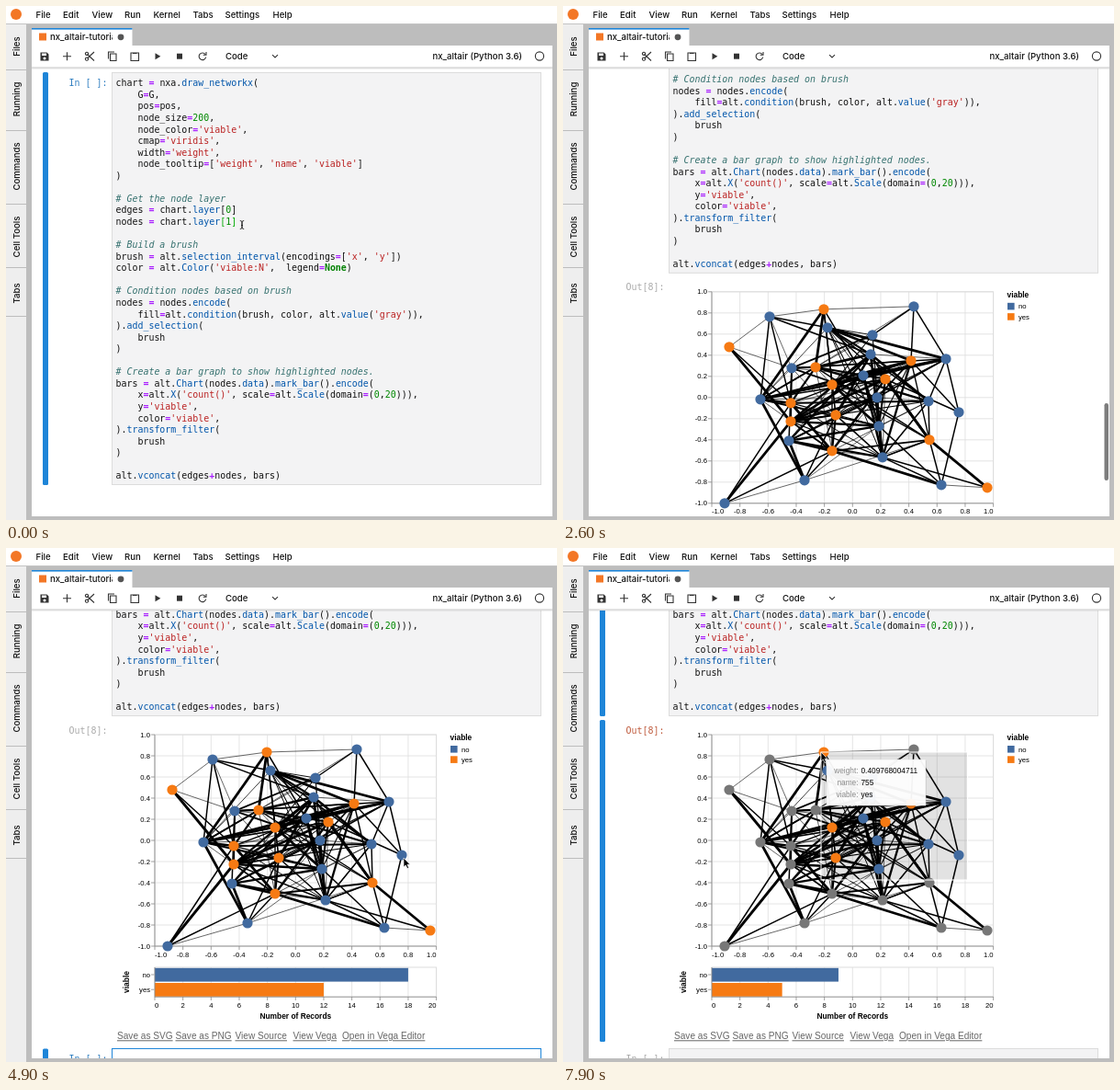
An HTML page for the animation above (8000 ms loop, 600x559 px).

```html
<!DOCTYPE html>
<html lang="en">
<head>
<meta charset="utf-8">
<title>Notebook brush demo</title>
<style>
html, body { margin: 0; width: 100%; height: 100%; overflow: hidden; background: #fff; }
svg { display: block; width: 600px; height: 559px; }
text { white-space: pre; }
.ui { font: 500 9.6px Inter, sans-serif; fill: #111; }
.code { font: 9.95px "DejaVu Sans Mono", monospace; fill: #111; }
.chart { font: 7.7px "Liberation Sans", Arial, sans-serif; fill: #000; }
.title { font-size: 8.4px; font-weight: bold; }
.link { font: 10.1px "Liberation Sans", Arial, sans-serif; fill: #666; text-decoration: underline; }
.tip { font: 8.3px "Liberation Sans", Arial, sans-serif; }
.icon { fill: none; stroke: #333; stroke-width: 1.1; }
.comment { fill: #36716f; font-style: italic; }
.string { fill: #ba2121; }
.op { fill: #a2f; font-weight: bold; }
.num { fill: #080; }
.word { fill: #008000; font-weight: bold; }
.prop { fill: #05a; }
.match { fill: #0a0; }
</style>
</head>
<body>
<script>
const LOOP = 8000, RUN = 1000, SELECT = 6500, DRAG = 6600, TIP = 7700;
const BLUE = '#416a9f', ORANGE = '#f67a13', GRAY = '#777', ACCENT = '#1e85d8', CELL = '#f3f3f4';
const LEFT = 162, TOP = 541, WIDE = 306.6, HIGH = 230, SCROLL_END = 338;

function el(tag, attrs, parent, text) {
  const node = document.createElementNS('http://www.w3.org/2000/svg', tag);
  for (const k in attrs) node.setAttribute(k, attrs[k]);
  if (text !== undefined) node.textContent = text;
  return parent.appendChild(node);
}
const set = (node, attrs) => { for (const k in attrs) node.setAttribute(k, attrs[k]); };
const show = (node, on) => node.setAttribute('visibility', on ? 'visible' : 'hidden');
const group = (parent, attrs = {}) => el('g', attrs, parent);
const rect = (parent, x, y, width, height, fill, more) =>
  el('rect', { x, y, width, height, fill, ...more }, parent);
const line = (parent, x1, y1, x2, y2, stroke, width = 1) =>
  el('line', { x1, y1, x2, y2, stroke, 'stroke-width': width }, parent);
const label = (parent, x, y, text, cls, anchor = 'start', more) =>
  el('text', { x, y, class: cls, 'text-anchor': anchor, ...more }, parent, text);

// Value of a keyframe track [[time, value], ...] at time t
function track(keys, t) {
  if (t <= keys[0][0]) return keys[0][1];
  for (let i = 1; i < keys.length; i++) {
    const [a, u] = keys[i - 1], [b, v] = keys[i];
    if (t < b) return u + (v - u) * (t - a) / (b - a);
  }
  return keys[keys.length - 1][1];
}
const smooth = (a, b, t) => {
  const p = Math.min(1, Math.max(0, (t - a) / (b - a)));
  return p * p * (3 - 2 * p);
};

const svg = el('svg', { viewBox: '0 0 600 559' }, document.body);
const defs = el('defs', {}, svg);
rect(el('clipPath', { id: 'page' }, defs), 28, 68, 567, 487);
rect(el('clipPath', { id: 'tab' }, defs), 46, 24, 70, 19);

// ---- Window frame ----
rect(svg, 0, 0, 600, 559, '#fff');
rect(svg, 0, 19.5, 23, 540, '#eee');
rect(svg, 23, 19.5, 577, 540, '#bdbdbd');
rect(svg, 28, 43, 567, 512, '#fff');
line(svg, 0, 19.5, 600, 19.5, '#c4c4c4');
line(svg, 22.5, 20, 22.5, 559, '#bdbdbd');
el('circle', { cx: 11, cy: 9, r: 6, fill: '#f37726' }, svg);
Object.entries({ File: 32.5, Edit: 62, View: 93.5, Run: 129, Kernel: 160.5, Tabs: 203.5, Settings: 238.5, Help: 290.5 })
  .forEach(([name, x]) => label(svg, x, 12.5, name, 'ui'));
Object.entries({ Files: 44, Running: 101.5, Commands: 174.5, 'Cell Tools': 251, Tabs: 312.5 })
  .forEach(([name, y]) => label(svg, 0, 0, name, 'ui', 'middle', { transform: `translate(14.5 ${y}) rotate(-90)` }));
[69.5, 135.5, 215.5, 284.5, 337.5].forEach(y => line(svg, 0, y, 22, y, '#bdbdbd'));

// ---- Scrolled page ----
const view = group(svg, { 'clip-path': 'url(#page)' });
const page = group(view);
const mono = (x, y, text, fill) => label(page, x, y, text, 'code', 'start', { style: `fill:${fill}` });

const source = `chart = nxa.draw_networkx(
    G=G,
    pos=pos,
    node_size=200,
    node_color='viable',
    cmap='viridis',
    width='weight',
    node_tooltip=['weight', 'name', 'viable']
)

# Get the node layer
edges = chart.layer[0]
nodes = chart.layer[1]

# Build a brush
brush = alt.selection_interval(encodings=['x', 'y'])
color = alt.Color('viable:N',  legend=None)

# Condition nodes based on brush
nodes = nodes.encode(
    fill=alt.condition(brush, color, alt.value('gray')),
).add_selection(
    brush
)

# Create a bar graph to show highlighted nodes.
bars = alt.Chart(nodes.data).mark_bar().encode(
    x=alt.X('count()', scale=alt.Scale(domain=(0,20))),
    y='viable',
    color='viable',
).transform_filter(
    brush
)

alt.vconcat(edges+nodes, bars)`;
const token = /(?<comment>#.*)|(?<string>'[^']*')|(?<word>\bNone\b)|(?<prop>(?<=\.)[a-zA-Z]\w*)|(?<num>\b\d+)|(?<op>[=+])|(?<match>\[(?=1)|(?<=1)\])|\w+|\s+|./g;

rect(page, 115.5, 72.5, 467, 448, CELL, { stroke: '#dcdcdc' });
source.split('\n').forEach((row, i) => {
  const text = label(page, 119.5, 87.3 + i * 12.56, undefined, 'code');
  for (const m of row.matchAll(token)) {
    const cls = Object.keys(m.groups).find(k => m.groups[k] !== undefined) || '';
    el('tspan', { class: cls }, text, m[0]);
  }
});
const codeBar = rect(page, 40, 72, 6, 449, ACCENT, { rx: 1.5 });
const inPrompt = mono(68.5, 87.3, 'In [ ]:', '#307fc1');

const output = group(page);
const outBar = rect(output, 40, 525, 6, 350, ACCENT, { rx: 1.5 });
const outPrompt = mono(68.5, 539.5, 'Out[8]:', '#aaa');
const nextBar = rect(output, 40, 882.5, 6, 30, ACCENT, { rx: 1.5 });
const nextPrompt = mono(68.5, 897.3, 'In [ ]:', '#307fc1');
const nextCell = rect(output, 115.5, 882.5, 467, 24, '#fff');
const caret = line(output, 120.5, 886, 120.5, 898, '#000');

// ---- Network chart ----
const chart = group(output, { class: 'chart' });
const bottom = TOP + HIGH;
rect(chart, LEFT, TOP, WIDE, HIGH, 'none', { stroke: '#ddd' });
for (let i = 0; i <= 10; i++) {
  const x = LEFT + i * WIDE / 10, y = bottom - i * HIGH / 10, text = ((i - 5) / 5).toFixed(1);
  line(chart, x, TOP, x, bottom, '#ddd', 0.8);
  line(chart, LEFT, y, LEFT + WIDE, y, '#ddd', 0.8);
  line(chart, x, bottom, x, bottom + 4, '#888', 0.8);
  line(chart, LEFT - 4, y, LEFT, y, '#888', 0.8);
  label(chart, x, bottom + 11.5, text, '', i === 0 ? 'start' : i === 10 ? 'end' : 'middle');
  label(chart, LEFT - 5, y + 2.7, text, '', 'end');
}
line(chart, LEFT, TOP, LEFT, bottom, '#888', 0.8);
line(chart, LEFT, bottom, LEFT + WIDE, bottom, '#888', 0.8);

const brushFill = rect(chart, 0, 0, 0, 0, '#333', { 'fill-opacity': 0.14 });

// Node centres in the fully scrolled view: first the "no" nodes, then the "yes" nodes
const noNodes = [[225, 230], [382, 219], [288, 242], [337, 250], [335, 271], [417, 276],
  [249, 286], [327, 294], [215, 320], [342, 318], [398, 322], [431, 334],
  [344, 349], [246, 365], [348, 383], [412, 413], [263, 408], [176, 433]];
const yesNodes = [[284, 222], [181, 263], [275, 285], [379, 278], [293, 304], [351, 298],
  [248, 324], [248, 344], [297, 337], [293, 376], [399, 364], [462, 416]];
const nodes = [...noNodes, ...yesNodes].map(([x, y], i) => ({ x, y, yes: i >= noNodes.length }));

const edge = (a, b, width) => line(chart, nodes[a].x, nodes[a].y + SCROLL_END,
  nodes[b].x, nodes[b].y + SCROLL_END, '#000', width);
const rim = [
  [2.8, [[17, 25], [19, 25], [18, 8], [2, 5], [2, 21], [5, 22], [5, 7], [29, 28], [15, 27],
    [16, 13], [13, 27], [27, 24], [12, 22], [18, 20], [8, 16], [28, 23]]],
  [1.5, [[17, 24], [17, 27], [0, 2], [0, 8], [0, 24], [0, 4], [1, 21], [1, 5], [1, 3], [29, 14],
    [15, 28], [15, 11], [15, 12], [16, 27], [16, 26], [14, 12], [14, 28], [5, 10], [5, 11],
    [11, 21], [11, 23], [8, 20], [8, 22], [14, 10], [18, 7], [18, 26], [18, 22], [15, 14], [19, 24]]],
  [0.6, [[17, 16], [19, 0], [0, 18], [18, 1], [1, 20], [29, 15], [16, 12], [16, 28], [0, 6], [8, 26], [19, 6]]]
];
rim.forEach(([width, pairs]) => pairs.forEach(([a, b]) => edge(a, b, width)));

// The dense middle is linked at random
let seed = 73914207;
const random = () => (seed = seed * 16807 % 2147483647) / 2147483647;
const inner = nodes.map((n, i) => i).filter(i =>
  Math.hypot((nodes[i].x - 322) / 108, (nodes[i].y - 310) / 88) < 1);
for (const a of inner) for (const b of inner) {
  if (a < b && random() < 0.52) edge(a, b, 0.6 + 2.2 * random() ** 1.6);
}
for (const n of nodes) n.dot = el('circle', { cx: n.x, cy: n.y + SCROLL_END, r: 5.6 }, chart);
const brushEdge = rect(chart, 0, 0, 0, 0, 'none', { stroke: '#fff' });

// ---- Legend, bars and links ----
label(chart, 483.5, 547, 'viable', 'title');
[['no', BLUE], ['yes', ORANGE]].forEach(([name, fill], i) => {
  rect(chart, 484, 553 + i * 11.3, 7.6, 7.6, fill);
  label(chart, 496, 559.6 + i * 11.3, name);
  label(chart, LEFT - 5, 804.5 + i * 16.2, name, '', 'end');
  line(chart, LEFT - 4, 802 + i * 16.2, LEFT, 802 + i * 16.2, '#888', 0.8);
});
rect(chart, LEFT, 794, WIDE, 32.2, 'none', { stroke: '#ddd' });
for (let v = 0; v <= 20; v += 2) {
  const x = LEFT + v * WIDE / 20;
  line(chart, x, 794, x, 826, '#ddd', 0.8);
  line(chart, x, 826, x, 830, '#888', 0.8);
  label(chart, x, 838, v, '', v === 0 ? 'start' : v === 20 ? 'end' : 'middle');
}
const noBar = rect(chart, LEFT, 794.8, 0, 14.8, BLUE);
const yesBar = rect(chart, LEFT, 811, 0, 14.8, ORANGE);
line(chart, LEFT, 794, LEFT, 826.2, '#888', 0.8);
line(chart, LEFT, 826.2, LEFT + WIDE, 826.2, '#888', 0.8);
label(chart, 315.3, 850.3, 'Number of Records', 'title', 'middle');
label(chart, 0, 0, 'viable', 'title', 'middle', { transform: 'translate(134 810) rotate(-90)' });
Object.entries({ 'Save as SVG': 121, 'Save as PNG': 184.5, 'View Source': 249.5, 'View Vega': 312.5, 'Open in Vega Editor': 366 })
  .forEach(([name, x]) => label(output, x, 872.3, name, 'link'));

const tip = group(output);
rect(tip, 287, 569, 109, 51, '#000', { opacity: 0.1, rx: 1 });
rect(tip, 287, 568, 108, 50, '#fff', { opacity: 0.95, stroke: '#ddd', 'stroke-width': 0.6 });
[['weight:', '0.409768004711'], ['name:', '755'], ['viable:', 'yes']].forEach(([key, value], i) => {
  label(tip, 321.5, 583.2 + i * 12.7, key, 'tip', 'end', { fill: '#888' });
  label(tip, 324.5, 583.2 + i * 12.7, value, 'tip', 'start', { fill: '#000' });
});

const thumb = rect(svg, 589.5, 0, 4.5, 84, '#7d7d7d', { rx: 2.2 });

// ---- Tab and toolbar ----
rect(svg, 28, 24, 109.5, 20, '#fff');
rect(svg, 28, 24, 109.5, 1.6, ACCENT);
rect(svg, 36, 29.5, 8, 8, '#f37726');
label(group(svg, { 'clip-path': 'url(#tab)' }), 48, 37, 'nx_altair-tutorial.ipynb', 'ui');
el('circle', { cx: 125, cy: 33.8, r: 3.4, fill: '#555' }, svg);
rect(svg, 28, 43, 567, 24, '#fff');
rect(svg, 28, 66.5, 567, 1, '#c8c8c8');
rect(svg, 28, 67.5, 567, 1.5, '#000', { opacity: 0.06 });
const icon = (d, more) => el('path', { d, class: 'icon', ...more }, svg);
const solid = { style: 'fill:#333;stroke:none' };
icon('M37.5 50.5h7l2 2v7h-9zM39 51.5v2.5h5v-2.5zM42 55.5a1.5 1.5 0 1 0 .01 0z', { ...solid, 'fill-rule': 'evenodd' });
icon('M62 54.7h9M66.5 50.2v9');
icon('M88.5 52.5L96 59.5M88.5 57L96 50M88 50.2a1.6 1.6 0 1 0 .01 0M88 56a1.6 1.6 0 1 0 .01 0');
icon('M113.5 52h6.5v7.5h-6.5zM111.5 57.5v-7.5h6.5');
icon('M136 51h8.5v8.5h-8.5zM138 51.4h4.5');
icon('M162.5 51.2l5.8 3.5-5.8 3.5z', solid);
icon('M186 51.7h6v6h-6z', solid);
icon('M217 52.5a3.8 3.8 0 1 0 .7 3M218 50v3.3h-3.3');
label(svg, 239, 58, 'Code', 'ui');
icon('M290 53.2l3 2.8 3-2.8');
label(svg, 562, 58, 'nx_altair (Python 3.6)', 'ui', 'end');
el('circle', { cx: 581, cy: 54.5, r: 4.6, class: 'icon' }, svg);

// ---- Pointers ----
const beam = el('path', { d: 'M254.8 233.5q2.2 0 2.2 1.5v6q0 1.5-2.2 1.5M259.2 233.5q-2.2 0-2.2 1.5v6q0 1.5 2.2 1.5M256 238.5h2',
  fill: 'none', stroke: '#222', 'stroke-width': 0.9 }, svg);
const arrow = el('path', { d: 'M0 0v10l2.3-2 1.6 3.6 1.7-.8-1.6-3.5h3z',
  fill: '#000', stroke: '#fff', 'stroke-width': 0.7 }, svg);

const scrollKeys = [[1850, 0], [2200, 85], [2600, 230], [2850, 278], [3100, 310], [3350, 330], [3600, SCROLL_END]];
const start = { x: 440.5, y: 361 }, end = { x: 281, y: 222 };

function pointer(t) {
  const a = smooth(3900, 4900, t), b = smooth(5000, 6000, t), c = smooth(DRAG, TIP, t);
  return { x: 257 + 176 * a + 8 * b - 160 * c, y: 238 + 99 * a + 23 * b - 138 * c };
}

function draw(t) {
  const ran = t >= RUN, picked = t >= SELECT, brushing = t >= DRAG;
  const scroll = track(scrollKeys, t);
  set(page, { transform: `translate(0 ${-scroll})` });
  show(output, ran);
  show(outPrompt, ran);
  show(nextPrompt, ran);
  show(codeBar, !ran || picked);
  show(outBar, picked);
  show(nextBar, ran && !picked);
  show(caret, ran && !picked && Math.floor((t - RUN) / 530) % 2 === 0);
  inPrompt.textContent = ran ? 'In [8]:' : 'In [ ]:';
  inPrompt.style.fill = !ran || picked ? '#307fc1' : '#aaa';
  outPrompt.style.fill = picked ? '#bf5b3d' : '#aaa';
  nextPrompt.style.fill = picked ? '#aaa' : '#307fc1';
  set(nextCell, { fill: picked ? CELL : '#fff', stroke: picked ? '#dcdcdc' : ACCENT });

  show(thumb, t > 1850 && t < 4200);
  set(thumb, { y: 432 + (scroll - 230) * 0.175 });

  const p = pointer(t), k = smooth(DRAG, TIP, t);
  const x = start.x + (end.x - start.x) * k, y = start.y + (end.y - start.y) * k;
  for (const box of [brushFill, brushEdge]) {
    show(box, brushing);
    set(box, { x, y: y + SCROLL_END, width: start.x - x, height: start.y - y });
  }
  let no = 0, yes = 0;
  for (const n of nodes) {
    const inside = !brushing || n.x >= x && n.x <= start.x && n.y >= y - 0.5 && n.y <= start.y;
    if (inside) n.yes ? yes++ : no++;
    set(n.dot, { fill: !inside ? GRAY : n.yes ? ORANGE : BLUE });
  }
  set(noBar, { width: no * WIDE / 20 });
  set(yesBar, { width: yes * WIDE / 20 });
  show(tip, t >= TIP);

  show(beam, !ran);
  show(arrow, t >= 3900);
  set(arrow, { transform: `translate(${p.x} ${p.y})` });
}

function frame(now) {
  draw(now % LOOP);
  requestAnimationFrame(frame);
}
draw(0);
requestAnimationFrame(frame);
</script>
</body>
</html>
```
